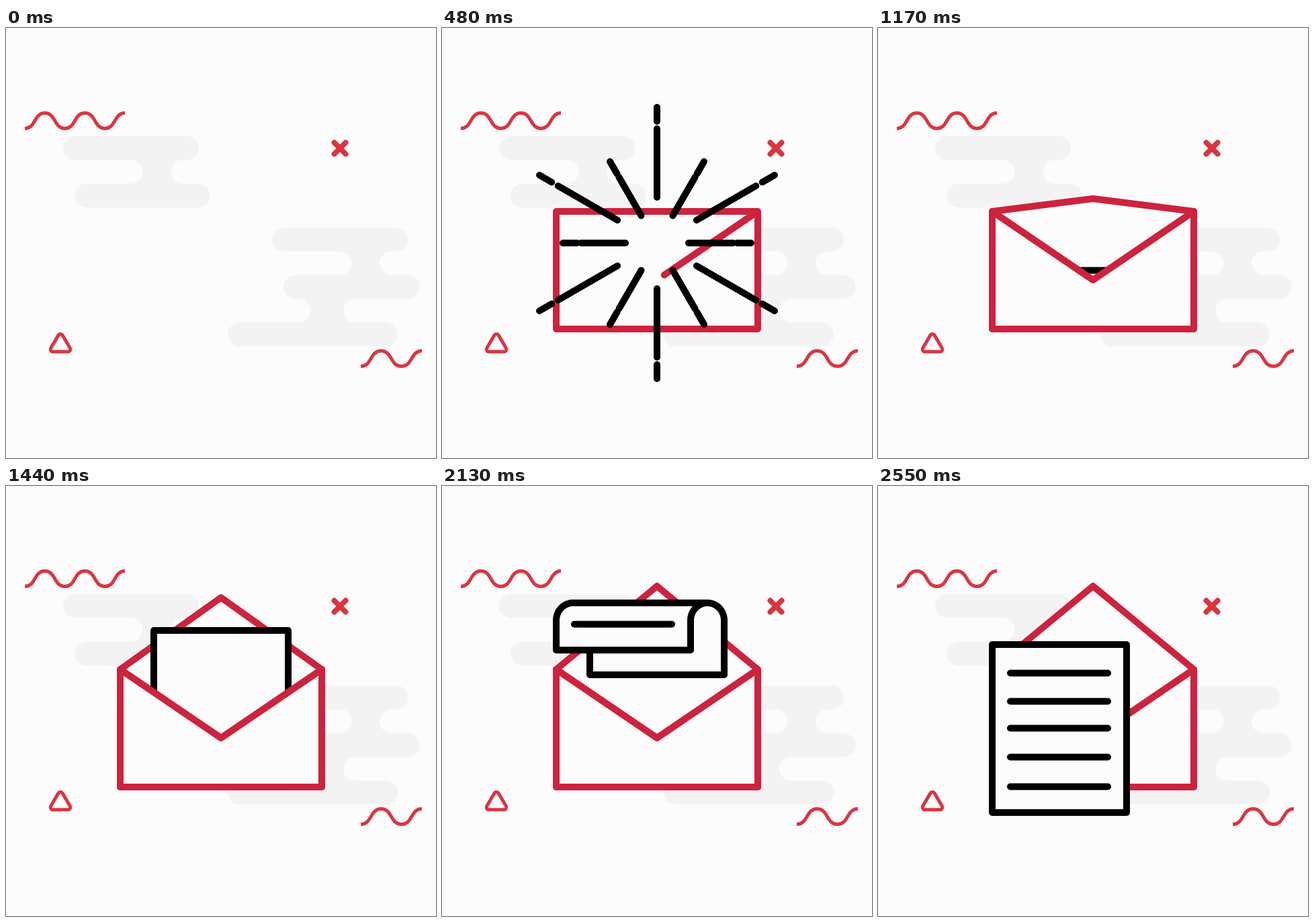
These frames come from a looping animation (640x640 px, 3.63 s). An HTML page with a canvas:

```html
<!DOCTYPE html>
<html lang="en">
<head>
<meta charset="utf-8">
<title>Letter</title>
<style>
html, body { margin: 0; width: 100%; height: 100%; overflow: hidden; background: #fcfcfc; }
canvas { display: block; width: 100vmin; height: 100vmin; }
</style>
</head>
<body>
<canvas id="stage" width="640" height="640"></canvas>
<script>
const LOOP = 3630, STEP = 30;
const PAPER = '#fcfcfc', CLOUD = '#f3f3f3', RED = '#cd233d', ACCENT = '#da3541', INK = '#000';
const c = document.getElementById('stage').getContext('2d');
c.lineCap = c.lineJoin = 'round';

// Cubic ease in and out, from time a to time b
function ease(t, a, b) {
  const u = Math.min(1, Math.max(0, (t - a) / (b - a)));
  return u < 0.5 ? 4 * u ** 3 : 1 - 4 * (1 - u) ** 3;
}

function trace(points, closed) {
  c.beginPath();
  points.forEach(([x, y]) => c.lineTo(x, y));
  if (closed) c.closePath();
}

function shape(points, color, closed = true) {
  trace(points, closed);
  c.fillStyle = PAPER;
  c.fill();
  c.strokeStyle = color;
  c.lineWidth = 10;
  c.stroke();
}

function line(x1, y1, x2, y2, color = INK, width = 10) {
  trace([[x1, y1], [x2, y2]]);
  c.strokeStyle = color;
  c.lineWidth = width;
  c.stroke();
}

// Background
const ROW = 35.4;

function bar(x, y, w) {
  c.fillStyle = CLOUD;
  c.beginPath();
  c.roundRect(x, y, w, ROW, ROW / 2);
  c.fill();
}

function link(left, right, y) {
  const r = ROW / 2;
  c.fillStyle = CLOUD;
  c.fillRect(left - r, y - 0.5, right - left + ROW, ROW + 1);
  c.fillStyle = PAPER;
  for (const x of [left - r, right + r]) {
    c.beginPath();
    c.arc(x, y + r, r, 0, 7);
    c.fill();
  }
}

function wave(x, y, count, w) {
  c.beginPath();
  c.moveTo(x, y);
  for (let i = 0; i < count; i++) {
    const from = i % 2 ? y - 23 : y, to = i % 2 ? y : y - 23, x0 = x + i * w;
    c.bezierCurveTo(x0 + w * 0.56, from, x0 + w * 0.44, to, x0 + w, to);
  }
  c.lineCap = 'butt';
  c.strokeStyle = ACCENT;
  c.lineWidth = 5;
  c.stroke();
  c.lineCap = 'round';
}

function background() {
  c.fillStyle = PAPER;
  c.fillRect(0, 0, 640, 640);
  link(203.5, 245, 161 + ROW);
  bar(85, 161, 202);
  bar(102, 161 + 2 * ROW, 201.5);
  link(515, 556, 297 + ROW);
  link(453, 502, 297 + 3 * ROW);
  bar(396, 297, 202.5);
  bar(413, 297 + 2 * ROW, 202.5);
  bar(330, 297 + 4 * ROW, 253);

  wave(28, 149.5, 5, 29.8);
  wave(528, 503.5, 3, 30.3);
  line(488.5, 170.5, 505.5, 187.5, ACCENT, 8);
  line(505.5, 170.5, 488.5, 187.5, ACCENT, 8);
  c.beginPath();
  c.moveTo(81, 481.7);
  c.arcTo(98.5, 481.7, 81, 452, 3.5);
  c.arcTo(81, 452, 63.5, 481.7, 3.5);
  c.arcTo(63.5, 481.7, 81, 481.7, 3.5);
  c.closePath();
  c.lineWidth = 5;
  c.stroke();
}

// Envelope
const TL = [170, 273], TR = [470, 273], BR = [470, 448], BL = [170, 448], FOLD = [320, 375];
const OUTLINE = [TR, TL, BL, BR, TR, FOLD, TL];

function drawOutline(length) {
  const points = [TR];
  for (let i = 1; i < OUTLINE.length && length > 0; i++) {
    const [x0, y0] = OUTLINE[i - 1], [x1, y1] = OUTLINE[i];
    const d = Math.hypot(x1 - x0, y1 - y0), k = Math.min(1, length / d);
    points.push([x0 + (x1 - x0) * k, y0 + (y1 - y0) * k]);
    length -= d;
  }
  shape(points, RED, false);
}

// Burst: each ray is a long and a short dash flying outwards
function ray(angle, tip, dashes) {
  const x = Math.cos(angle), y = Math.sin(angle);
  for (const [near, far] of dashes) {
    const a = Math.max(0, tip - near), b = tip - far;
    if (b > 0) line(320 + x * a, 320 + y * a, 320 + x * b, 320 + y * b);
  }
}

function burst(t) {
  for (let i = 0; i < 12; i++) {
    const long = [1, 3, 5].includes(i % 6);
    if (long) ray(i * Math.PI / 6, (t - 480) * 1.55 + 202, [[134, 32], [21, 0]]);
    else ray(i * Math.PI / 6, (t - 480) * 1.55 + 140, [[93, 27], [21, 0]]);
  }
}

// Sheet: slides up, over a half circle and down the front
const ARC = 80;

function along(s) {
  if (s < 0) return [220, 200 - s];
  if (s > ARC) return [170, 200 + s - ARC];
  const a = s / ARC * Math.PI;
  return [195 + 25 * Math.cos(a), 200 - 26 * Math.sin(a)];
}

function sheet(from, to) {
  const left = [];
  for (let s = from; s < to; s += 2) left.push(along(s));
  left.push(along(to));
  const right = left.map(([x, y]) => [x + 200, y]).reverse();
  shape([...left, ...right], INK);
}

function letter(t) {
  const turn = ease(t, 1860, 2550);
  const tip = -185 + 233 * ease(t, 900, 1811) + 318 * turn;
  const tail = Math.max(-236, tip - 187 - 63 * Math.min(1, 1.2 * turn));
  const top = ARC / 2;

  shape([TL, [320, 273 - 124 * ease(t, 900, 1700)], TR, BR, BL], RED);
  if (tail < top) sheet(tail, Math.min(tip, top));
  shape([TL, FOLD, TR, BR, BL], RED);
  if (tip > top) {
    sheet(Math.max(tail, top), tip);
    for (const d of [38.5, 82.5, 125.5, 165.5, 207.5]) {
      if (tip - d < top + 5) continue;
      const [x, y] = along(tip - d);
      line(x + 27, y, x + 172, y);
    }
  }
}

function draw(t) {
  background();
  if (t >= 900) return letter(t);
  if (t > 0) drawOutline(t * 2.33);
  burst(t);
}

const start = performance.now();
function tick() {
  const t = (performance.now() - start) % LOOP;
  draw(Math.floor(t / STEP) * STEP);
  requestAnimationFrame(tick);
}
tick();
</script>
</body>
</html>
```
